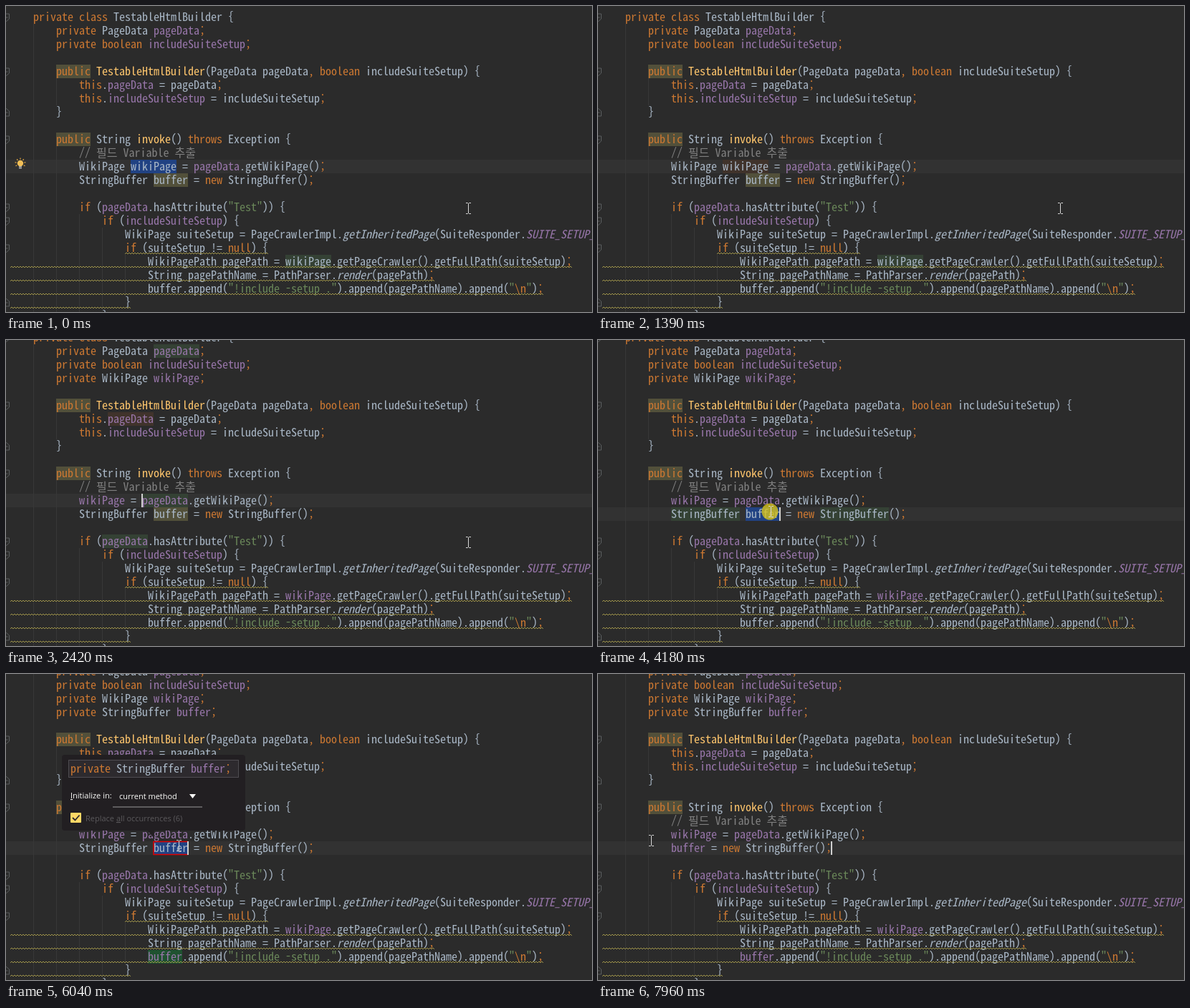
Recreate the animation shown at these times as an HTML page. Size 818 by 428 pixels, loop 8000 ms.

```html
<!DOCTYPE html>
<html lang="ko">
<head>
<meta charset="utf-8">
<title>Introduce field</title>
<style>
  html, body { margin: 0; width: 100%; height: 100%; overflow: hidden; background: #2b2b2b; }
  svg { display: block; }
  text { white-space: pre; }
  .code { font-family: "Noto Sans Mono CJK KR", "Noto Sans Mono CJK JP", "Noto Sans Mono", "Liberation Mono", monospace; }
  .ui { font-family: "Open Sans", "Noto Sans", sans-serif; font-size: 11px; }
</style>
</head>
<body>
<svg id="stage" width="818" height="428" viewBox="0 0 818 428"></svg>
<script>
const LOOP = 8000, CELL = 8, ROW = 19;
const stage = document.getElementById('stage');
const rowTop = row => 6 + ROW * row;
const between = (t, from, to) => t >= from && t < to;

// Font size that gives an advance of one cell
const probe = document.createElement('canvas').getContext('2d');
probe.font = '100px "Noto Sans Mono CJK KR","Noto Sans Mono CJK JP","Noto Sans Mono","Liberation Mono",monospace';
const codeSize = CELL * 100 / probe.measureText('m').width;

const INK = { plain: '#a9b7c6', keyword: '#cc7832', field: '#9876aa', method: '#ffc66d', string: '#6a8759', comment: '#808080' };
const BG = { read: '#344134', write: '#40332b', weak: '#52503a', select: '#214283', template: '#1f5230' };
const KEYWORDS = new Set('private public class boolean this throws new if null'.split(' '));
// Prefixes: @ field, # declaration, ~ static call, ^ static field
const PREFIX = { '@': [INK.field], '#': [INK.method], '~': [INK.plain, 1], '^': [INK.field, 1] };
const TOKENS = /\/\/.*|\\n|(?<=\\n)"|"[^"\\]*"?|[@#~^]?\w+|[;,]|[^\w@#~^";,\\]+/g;

const rect = (x, y, w, h, fill, extra = '') =>
  `<rect x="${x}" y="${y}" width="${w}" height="${h}" fill="${fill}" ${extra}/>`;
const path = (d, stroke, width = 1, extra = '') =>
  `<path d="${d}" fill="none" stroke="${stroke}" stroke-width="${width}" ${extra}/>`;
const escapeText = s => s.replace(/&/g, '&amp;').replace(/</g, '&lt;');
const codeText = (x, y, s, fill, italic) =>
  `<text class="code" x="${x}" y="${y}" font-size="${codeSize}" fill="${fill}"${italic ? ' font-style="italic"' : ''}>${escapeText(s)}</text>`;
const uiText = (x, y, s, fill, extra = '') =>
  `<text class="ui" x="${x}" y="${y}" fill="${fill}" ${extra}>${s}</text>`;

function tokenInk(token) {
  if (token.startsWith('//')) return [INK.comment];
  if (token === '\\n' || token === ';' || token === ',' || KEYWORDS.has(token)) return [INK.keyword];
  if (token[0] === '"') return [INK.string];
  return PREFIX[token[0]] || [INK.plain];
}

function codeLine(x, baseline, source) {
  let out = '';
  for (const [token] of source.matchAll(TOKENS)) {
    const [fill, italic] = tokenInk(token);
    const shown = PREFIX[token[0]] ? token.slice(1) : token;
    out += codeText(x, baseline, shown, fill, italic);
    x += shown.length * CELL;
  }
  return out;
}

const indentX = level => 38 + 32 * level;

function sourceLines(t) {
  const wikiField = t >= 1490, bufferField = t >= 5790;
  const header = [[0, 'private class TestableHtmlBuilder {'], [1, 'private PageData @pageData;'], [1, 'private boolean @includeSuiteSetup;']];
  if (wikiField) header.push([1, 'private WikiPage @wikiPage;']);
  if (bufferField) header.push([1, 'private StringBuffer @buffer;']);
  const lines = header.map(([level, s], i) => [i + 3 - header.length, level, s]);
  const wiki = wikiField ? '@wikiPage' : 'wikiPage';
  const buffer = bufferField ? '@buffer' : 'buffer';
  lines.push(
    [4, 1, 'public #TestableHtmlBuilder(PageData pageData, boolean includeSuiteSetup) {'],
    [5, 2, 'this.@pageData = pageData;'],
    [6, 2, 'this.@includeSuiteSetup = includeSuiteSetup;'],
    [7, 1, '}'],
    [9, 1, 'public String #invoke() throws Exception {'],
    [10, 2, '// 필드 Variable 추출'],
    [11, 2, (t < 2170 ? 'WikiPage wikiPage' : '@wikiPage') + ' = @pageData.getWikiPage();'],
    [12, 2, (t < 6110 ? 'StringBuffer buffer' : '@buffer') + ' = new StringBuffer();'],
    [14, 2, 'if (@pageData.hasAttribute("Test")) {'],
    [15, 3, 'if (@includeSuiteSetup) {'],
    [16, 4, 'WikiPage suiteSetup = PageCrawlerImpl.~getInheritedPage(SuiteResponder.^SUITE_SETUP_NAME'],
    [17, 4, 'if (suiteSetup != null) {'],
    [18, 5, `WikiPagePath pagePath = ${wiki}.getPageCrawler().getFullPath(suiteSetup);`],
    [19, 5, 'String pagePathName = PathParser.~render(pagePath);'],
    [20, 5, `${buffer}.append("!include -setup .").append(pagePathName).append("\\n");`],
    [21, 4, '}'],
    [22, 3, '}']);
  return lines;
}

// Background marks: row, x, length in characters, colour
function marks(t) {
  const list = [[4, 70, 6, BG.weak], [9, 70, 6, BG.weak]];
  const add = (from, to, ...items) => { if (between(t, from, to)) list.push(...items); };
  add(0, 530, [11, 174, 8, BG.select]);
  add(530, 1490, [11, 174, 8, BG.write]);
  add(0, 1490, [18, 390, 8, BG.read]);
  add(1490, 2170, [11, 174, 8, BG.select], [18, 390, 8, BG.template]);
  add(2170, 2420, [11, 102, 8, BG.write], [18, 390, 8, BG.read]);
  add(2420, 2960, [0, 206, 8, BG.read], [5, 142, 8, BG.write], [14, 134, 8, BG.read]);
  add(2420, 2660, [11, 190, 8, BG.read]);
  add(0, 4100, [12, 206, 6, BG.weak]);
  add(3330, 4400, [12, 102, 12, BG.read], [12, 310, 12, BG.read]);
  add(4100, 5100, [12, 206, 6, BG.select]);
  add(4400, 5790, [20, 198, 6, BG.read]);
  add(5100, 5790, [12, 206, 6, BG.write]);
  add(5790, 6110, [12, 206, 6, BG.select], [20, 198, 6, BG.template]);
  return list;
}

const CARETS = [[0], [310, 11, 238], [530], [1490, 11, 238], [2170, 11, 166], [2420, 11, 190], [2660, 12, 190],
  [2810, 12, 198], [4100, 12, 254], [4940], [5790, 12, 254], [6110, 12, 150], [7420, 12, 326]];
const MOUSE = [[0, 645, 283], [3330, 645, 283], [3410, 683, 262], [3570, 600, 224], [3810, 437, 236], [3960, 437, 236],
  [4100, 241, 240], [6820, 241, 240], [7050, 300, 145], [7300, 370, 200], [7420, 385, 247], [7500, 385, 235],
  [7660, 385, 235], [7960, 74, 233], [LOOP, 74, 233]];

function mouseAt(t) {
  const i = MOUSE.findIndex(([time]) => time > t) - 1;
  const [t0, x0, y0] = MOUSE[i], [t1, x1, y1] = MOUSE[i + 1];
  const steps = Math.max(1, Math.round((t1 - t0) / 75));
  const k = Math.floor((t - t0) / (t1 - t0) * steps) / steps;
  return [Math.round(x0 + (x1 - x0) * k), Math.round(y0 + (y1 - y0) * k)];
}

function mouse(t) {
  const [x, y] = mouseAt(t);
  const pressed = between(t, 4100, 4330) || between(t, 7420, 7660);
  const spot = pressed ? `<circle cx="${x - 1}" cy="${y}" r="11.5" fill="#d6c21c" opacity=".8"/>` : '';
  return spot + path(`M${x - 3} ${y - 7.5}h2.5l1 1 1-1H${x + 4}M${x - 3} ${y + 7.5}h2.5l1-1 1 1H${x + 4}M${x + .5} ${y - 7}v14`, '#d8d8d8');
}

function wave(x0, x1, y) {
  let d = `M${x0} ${y}`;
  for (let x = x0; x < x1; x += 4) d += 'l2-2l2 2';
  return path(d, '#a0954a');
}

function foldIcon(row, closing) {
  const y = rowTop(row) + 10, s = closing ? -1 : 1;
  return path(`M-4 ${y - 5 * s}H4.5V${y + 2 * s}L.5 ${y + 5.5 * s}L-4 ${y + 2 * s}M-2 ${y}H2.5`, '#5a5d5f');
}

function bulb(x, y) {
  let rays = '';
  for (let a = 0; a < 7; a++) {
    const angle = Math.PI * (5 / 6 + a * 2 / 9), c = Math.cos(angle), s = Math.sin(angle);
    rays += `M${x + 5.5 * c} ${y + 5.5 * s}L${x + 7.5 * c} ${y + 7.5 * s}`;
  }
  return path(rays, '#d9a343', 1.3) + `<circle cx="${x}" cy="${y}" r="4.2" fill="#f2bf57"/>` +
    rect(x - 2, y + 4, 4, 1.4, '#b5b5b5') + rect(x - 2, y + 6, 4, 1.4, '#b5b5b5');
}

function chooser(x, y) {
  const item = (dy, name, fill, module) =>
    `<circle cx="${x + 16}" cy="${y + dy}" r="7" fill="#4793ad"/>` +
    path(`M${x + 18.6} ${y + dy - 2.3}a3.4 3.4 0 1 0 0 4.6`, '#1f2d33', 1.5) +
    codeText(x + 27, y + dy + 5, name, fill) + codeText(x + 433, y + dy + 5, 'cleancoders', module) +
    `<path d="M${x + 526} ${y + dy - 6}h5l2 2h6v10h-13z" fill="#ab9df2"/>` + rect(x + 534, y + dy + 1, 5, 5, '#78dce8', 'stroke="#221f22"');
  return rect(x, y, 549, 68, '#221f22') + rect(x, y, 549, 22, '#19181a') + rect(x, y + 22, 549, 23, '#5b595c') +
    uiText(x + 274, y + 16, 'Choose class to introduce field', '#fcfcfa', 'text-anchor="middle" style="font-size:11.7px"') +
    item(33, 'TestableHtmlBuilder in FitnessExample (function)', '#ffd866', '#ffd866') +
    item(56, 'FitnessExample (function)', '#78dce8', '#d0cfcf') +
    rect(x + .5, y + .5, 548, 67, 'none', 'stroke="#19181a"');
}

function balloon(x, y, declaration, tailX, occurrences) {
  const width = declaration.replace('@', '').length * CELL + 32, height = occurrences ? 106 : 80;
  const bottom = y + height;
  let out = `<path d="M${tailX - 9} ${bottom - 1}h10l-1 11z" fill="#221f22"/>` +
    rect(x, y, width, height, '#221f22', 'rx="4"') +
    rect(x + 9.5, y + 7.5, width - 19, 24, '#2d2a2e', 'stroke="#77757a" stroke-dasharray="1 1"') +
    codeLine(x + 12, y + 25, declaration) +
    uiText(x + 12, y + 61, '<tspan text-decoration="underline">I</tspan>nitialize in:', '#fcfcfa') +
    uiText(x + 80, y + 62, 'current method', '#fcfcfa') +
    `<path d="M${x + 178} ${y + 55}h9l-4.5 6z" fill="#fcfcfa"/>` +
    path(`M${x + 71} ${y + 73}h125`, '#727072', 1.5);
  if (occurrences) {
    out += rect(x + 12, y + 81, 15, 14, '#ffd866', 'rx="1"') +
      path(`M${x + 15} ${y + 88}l3.5 3.5 6-7`, '#2d2a2e', 1.8) +
      uiText(x + 33, y + 93, `Replace <tspan text-decoration="underline">a</tspan>ll occurrences (${occurrences})`, '#5b595c');
  }
  return out;
}

function nameList() {
  return rect(158, 235, 256, 100, '#2d2a2e', 'stroke="#19181a"') + rect(159, 236, 254, 22, '#5b595c') +
    codeText(174, 252, 'wikiPage', '#ffd866') + codeText(174, 274, 'page', INK.plain);
}

const GUIDES = [[38, -1, 23], [70, 5, 7], [70, 10, 23], [102, 15, 23], [134, 16, 22], [166, 18, 21]];
const WAVES = [[17, 166, 366], [18, 6, 790], [19, 6, 598], [20, 6, 750], [21, 6, 174]];

function draw(t) {
  const caretRow = t < 2660 ? 11 : 12;
  const classRow = t < 1490 ? 0 : t < 5790 ? -1 : -2;
  let out = rect(0, 0, 818, 428, '#2b2b2b') + rect(0, rowTop(caretRow), 818, ROW, '#323232');
  for (const [x, from, to] of GUIDES) {
    const first = Math.max(from, classRow + 1);
    out += rect(x, rowTop(first), 1, ROW * (to - first), '#383838');
  }
  for (const [row, x, length, fill] of marks(t)) out += rect(x, rowTop(row), length * CELL, ROW, fill);
  for (const row of [classRow, 4, 9, 14, 15, 17]) out += foldIcon(row);
  for (const row of [7, 21]) out += foldIcon(row, true);
  for (const [row, level, s] of sourceLines(t)) out += codeLine(indentX(level), rowTop(row) + 15, s);
  for (const [row, from, to] of WAVES) out += wave(from, to, rowTop(row) + 18);

  if (between(t, 1490, 2170)) out += rect(174, 215.5, 64, 18, 'none', 'stroke="#e00000" stroke-width="1.5"');
  if (between(t, 5790, 6110)) out += rect(206, 234.5, 48, 18, 'none', 'stroke="#e00000" stroke-width="1.5"');
  const [, row, x] = CARETS.filter(([time]) => time <= t).pop();
  if (row) out += rect(x - 1, rowTop(row), 2, ROW, '#d0d0d0');

  if (t < 530) out += bulb(20, 220);
  if (between(t, 3570, 3960) || between(t, 6660, 7420)) out += bulb(20, 239);
  if (between(t, 530, 1390)) out += chooser(237, 234);
  if (between(t, 5100, 5730)) out += chooser(253, 253);
  if (between(t, 1490, 2100)) out += balloon(63, 132, 'private WikiPage @wikiPage;', 174);
  if (between(t, 1710, 2100)) out += nameList();
  if (between(t, 5790, 6110)) out += balloon(78, 113, 'private StringBuffer @buffer;', 206, 6);
  return out + mouse(t);
}

const start = performance.now();
let shown = '';
function tick() {
  const picture = draw(Math.max(0, performance.now() - start) % LOOP);
  if (picture !== shown) stage.innerHTML = shown = picture;
  requestAnimationFrame(tick);
}
tick();
</script>
</body>
</html>
```
